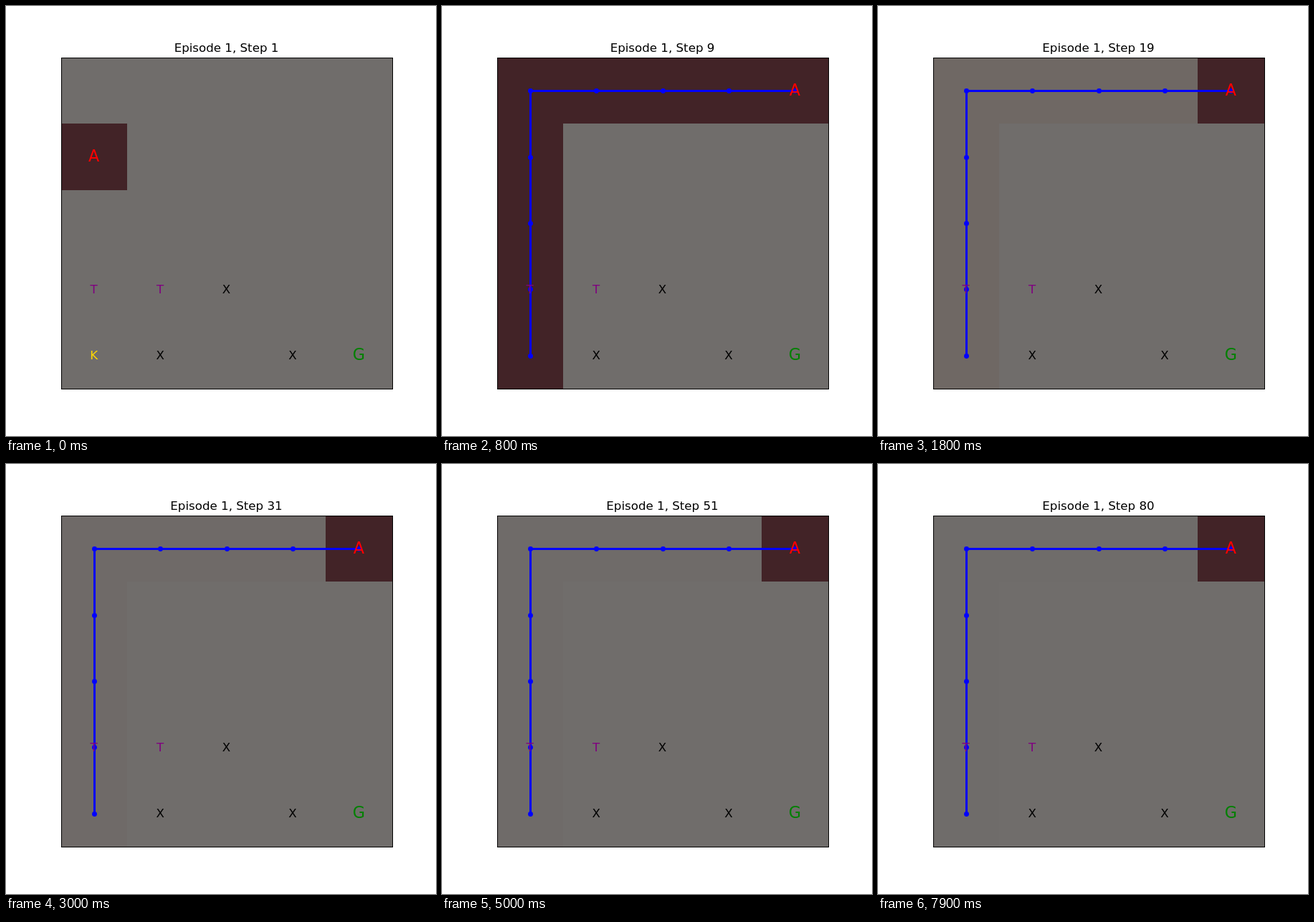
Write an HTML page that moves like this. It is 600 px wide and 600 px high and loops after 8000 ms.

```html
<!DOCTYPE html>
<html lang="en">
<head>
<meta charset="utf-8">
<title>Grid walk</title>
<style>
  html, body { margin: 0; width: 100%; height: 100%; overflow: hidden; background: #fff; }
  svg { display: block; width: 600px; height: 600px; }
  text { font-family: "DejaVu Sans", sans-serif; font-size: 16.667px; text-anchor: middle; }
  .big { font-size: 22.222px; }
</style>
</head>
<body>
<svg viewBox="0 0 600 600">
  <text id="title" x="307.5" y="64"></text>
  <g id="cells" shape-rendering="crispEdges"></g>
  <g id="trail" fill="#00f">
    <polyline id="line" fill="none" stroke="#00f" stroke-width="3" stroke-linejoin="round" stroke-linecap="square"/>
  </g>
  <rect x="77.5" y="72.5" width="462" height="462" fill="none" stroke="#000"/>
  <g id="labels"></g>
</svg>
<script>
const STEP_MS = 100, STEPS = 80;
const LEFT = 76.5, TOP = 72, CELL = 92.4;

// Cells visited in order, as [row, column]; the agent then stays on the last one.
const route = [[1, 0], [2, 0], [3, 0], [4, 0], [0, 0], [0, 1], [0, 2], [0, 3], [0, 4]];
const KEY_STEP = 4;

// Light-to-dark red colour scale, evenly spaced stops.
const reds = [
  [255, 245, 240], [254, 224, 210], [252, 187, 161], [252, 146, 114], [251, 106, 74],
  [239, 59, 44], [203, 24, 29], [165, 15, 21], [103, 0, 13]
];
const ALPHA = 0.3, BASE = 35;

const $ = id => document.getElementById(id);
const snap = v => Math.floor(v + 0.5) + 0.5;
const midX = col => LEFT + CELL * (col + 0.5);
const midY = row => TOP + CELL * (row + 0.5);

function add(parent, tag, attrs, content = "") {
  const el = document.createElementNS("http://www.w3.org/2000/svg", tag);
  for (const name in attrs) el.setAttribute(name, attrs[name]);
  el.textContent = content;
  return $(parent).appendChild(el);
}

function heat(value) {
  const pos = value * (reds.length - 1);
  const i = Math.min(Math.floor(pos), reds.length - 2);
  const mix = reds[i].map((a, k) => a + (reds[i + 1][k] - a) * (pos - i));
  return `rgb(${mix.map(c => Math.round(c * ALPHA + BASE)).join(",")})`;
}

function label(char, row, col, fill, big) {
  return add("labels", "text", {
    x: midX(col), y: Math.ceil(midY(row) + (big ? 6.1 : 4.6)), fill, class: big ? "big" : ""
  }, char);
}

add("cells", "rect", { x: 77, y: 72, width: 462, height: 462, fill: heat(0) });
const tiles = route.map(([row, col]) => {
  const x = Math.round(LEFT + CELL * col), y = Math.round(TOP + CELL * row);
  return add("cells", "rect", {
    x, y,
    width: Math.round(LEFT + CELL * (col + 1)) - x,
    height: Math.round(TOP + CELL * (row + 1)) - y
  });
});

const points = route.map(([row, col]) => [snap(midX(col)), snap(midY(row))]);
const dots = points.map(([cx, cy]) => add("trail", "circle", { cx, cy, r: 3.45 }));

const key = label("K", 4, 0, "#ffd700");
label("G", 4, 4, "#008000", true);
label("T", 3, 0, "#800080");
label("T", 3, 1, "#800080");
label("X", 3, 2, "#000");
label("X", 4, 1, "#000");
label("X", 4, 3, "#000");
const agent = label("A", 1, 0, "#f00", true);

const show = (el, on) => el.setAttribute("visibility", on ? "visible" : "hidden");

function draw(step) {
  const seen = Math.min(step, route.length);
  const [row, col] = route[seen - 1];
  const most = Math.max(1, step - route.length + 1);

  $("title").textContent = `Episode 1, Step ${step}`;
  tiles.forEach((tile, i) => {
    const visits = i >= seen ? 0 : i === route.length - 1 ? most : 1;
    tile.setAttribute("fill", heat(visits / most));
  });
  $("line").setAttribute("points", seen > 1 ? points.slice(0, seen).join(" ") : "");
  dots.forEach((dot, i) => show(dot, seen > 1 && i < seen));
  show(key, step < KEY_STEP);
  agent.setAttribute("x", midX(col));
  agent.setAttribute("y", Math.ceil(midY(row) + 6.1));
}

let shown = 0;
function tick() {
  const step = Math.floor(performance.now() / STEP_MS) % STEPS + 1;
  if (step !== shown) draw(shown = step);
  requestAnimationFrame(tick);
}
tick();
</script>
</body>
</html>
```
